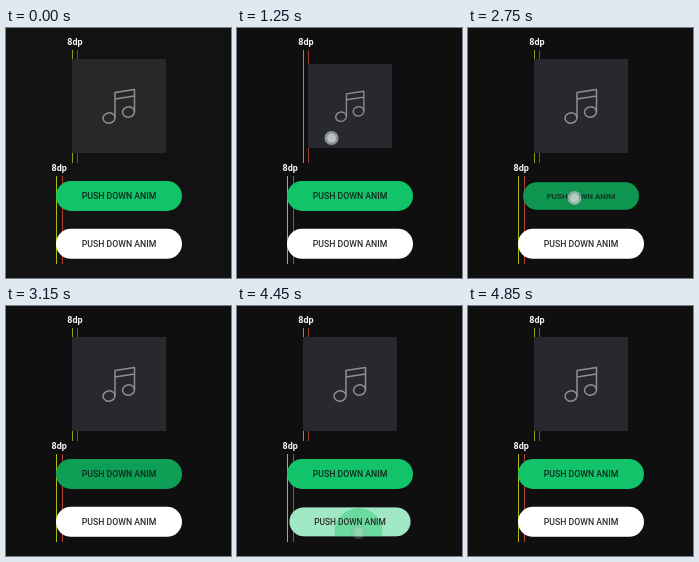
An HTML page with a canvas for the animation above (5350 ms loop, 225 by 250 pixels).

```html
<!DOCTYPE html>
<html lang="en">
<head>
<meta charset="utf-8">
<title>Push down animation</title>
<style>
  html, body { margin: 0; width: 100%; height: 100%; overflow: hidden; background: #0f0f0f; }
  canvas { display: block; width: 225px; height: 250px; }
</style>
</head>
<body>
<canvas id="stage"></canvas>
<script>
const W = 225, H = 250, LOOP = 5350, STEP = 50;
const canvas = document.getElementById('stage');
const ctx = canvas.getContext('2d');
const dpr = window.devicePixelRatio || 1;
canvas.width = W * dpr;
canvas.height = H * dpr;

const tile = { x: 113, y: 78, size: 94, min: 0.894, down: 600, up: 1250, touch: [94.5, 110] };

const buttons = [
  { x: 113, y: 168, fill: '#12c369', ink: '#10291c', tint: '0,0,0', hold: 0.24, ripple: 0.2,
    down: 2050, up: 2750, tintFrom: 2450, tintTo: 2750, fadeTo: 3350, touch: [106.5, 170] },
  { x: 113, y: 215.8, fill: '#ffffff', ink: '#2c2c2c', tint: '18,195,105', hold: 0.4, ripple: 0.37,
    down: 3500, up: 4400, tintFrom: 3800, tintTo: 4100, fadeTo: 4850, touch: [121.5, 226] }
];
const BTN_W = 126, BTN_H = 30, BTN_MIN = 0.92;

const ramp = (t, a, b) => Math.min(1, Math.max(0, (t - a) / (b - a)));
const smooth = p => p * p * (3 - 2 * p);

// 0 at rest, 1 fully pressed
function press(t, o, releaseTime) {
  return smooth(ramp(t, o.down, o.down + 100)) * (1 - smooth(ramp(t, o.up, o.up + releaseTime)));
}

function scaled(x, y, s, draw) {
  ctx.save();
  ctx.translate(x, y);
  ctx.scale(s, s);
  draw();
  ctx.restore();
}

function disc(x, y, r, color) {
  ctx.fillStyle = color;
  ctx.beginPath();
  ctx.arc(x, y, r, 0, 7);
  ctx.fill();
}

function guide(x, top, bottom, color) {
  ctx.fillStyle = color;
  ctx.fillRect(x, top, 1, bottom - top);
}

function label(text, x, y, font, color) {
  ctx.font = font + ' Roboto, Arial, sans-serif';
  ctx.fillStyle = color;
  ctx.textAlign = 'center';
  ctx.fillText(text, x, y);
}

function drawNote() {
  ctx.strokeStyle = '#8f8f91';
  ctx.lineWidth = 1.5;
  ctx.lineJoin = 'round';
  ctx.beginPath();
  ctx.moveTo(-4, 12);
  ctx.lineTo(-4, -13.5);
  ctx.lineTo(15.5, -16.5);
  ctx.lineTo(15.5, 6);
  ctx.moveTo(-4, -7);
  ctx.lineTo(15.5, -10);
  ctx.stroke();
  for (const [x, y] of [[-10, 12], [9.5, 6]]) {
    ctx.beginPath();
    ctx.ellipse(x, y, 6, 5.2, -0.2, 0, 7);
    ctx.stroke();
  }
}

function drawTile(t) {
  const s = 1 - (1 - tile.min) * press(t, tile, 200);
  scaled(tile.x, tile.y, s, () => {
    ctx.fillStyle = t < tile.down ? '#282829' : '#28292e';
    ctx.fillRect(-tile.size / 2, -tile.size / 2, tile.size, tile.size);
    drawNote();
  });
}

function drawButton(t, b) {
  const s = 1 - (1 - BTN_MIN) * press(t, b, 100);
  const fade = 1 - ramp(t, b.up + 150, b.fadeTo);
  const tint = b.hold * ramp(t, b.tintFrom, b.tintTo) * fade;
  scaled(b.x, b.y, s, () => {
    ctx.beginPath();
    ctx.roundRect(-BTN_W / 2, -BTN_H / 2, BTN_W, BTN_H, BTN_H / 2);
    ctx.fillStyle = b.fill;
    ctx.fill();
    ctx.fillStyle = `rgba(${b.tint},${tint})`;
    ctx.fill();
    if (t > b.up && fade > 0) {
      ctx.save();
      ctx.clip();
      disc((b.touch[0] - b.x) / s, (b.touch[1] - b.y) / s, (t - b.up) * 0.5,
        `rgba(${b.tint},${b.ripple * fade})`);
      ctx.restore();
    }
    label('PUSH DOWN ANIM', 0, 3.2, '500 8.7px', b.ink);
  });
}

function drawTouch(t, o) {
  if (t < o.down) return;
  const alpha = 1 - ramp(t, o.up, o.up + 75);
  if (alpha <= 0) return;
  const [x, y] = o.touch;
  ctx.save();
  ctx.globalAlpha = alpha;
  disc(x, y + 0.5, 8, 'rgba(60,70,75,0.2)');
  disc(x, y, 7, 'rgba(205,210,210,0.6)');
  disc(x, y, 4.5, 'rgba(235,240,238,0.5)');
  ctx.restore();
}

function draw(t) {
  ctx.setTransform(dpr, 0, 0, dpr, 0, 0);
  ctx.fillStyle = t < tile.down ? '#121212' : '#0f0f0f';
  ctx.fillRect(0, 0, W, H);

  guide(66, 22, 135, '#969c14');
  guide(71, 22, 135, '#9c3a2c');
  guide(50, 148, 236, '#b0b814');
  guide(56, 148, 236, '#b04030');
  label('8dp', 69, 17.3, 'bold 9px', '#f4f4f4');
  label('8dp', 53.2, 143.3, 'bold 9px', '#f4f4f4');

  drawTile(t);
  for (const b of buttons) drawButton(t, b);
  for (const o of [tile, ...buttons]) drawTouch(t, o);
}

const start = performance.now();
function tick() {
  const t = (performance.now() - start) % LOOP;
  draw(Math.floor(t / STEP) * STEP);
  requestAnimationFrame(tick);
}
tick();
</script>
</body>
</html>
```
